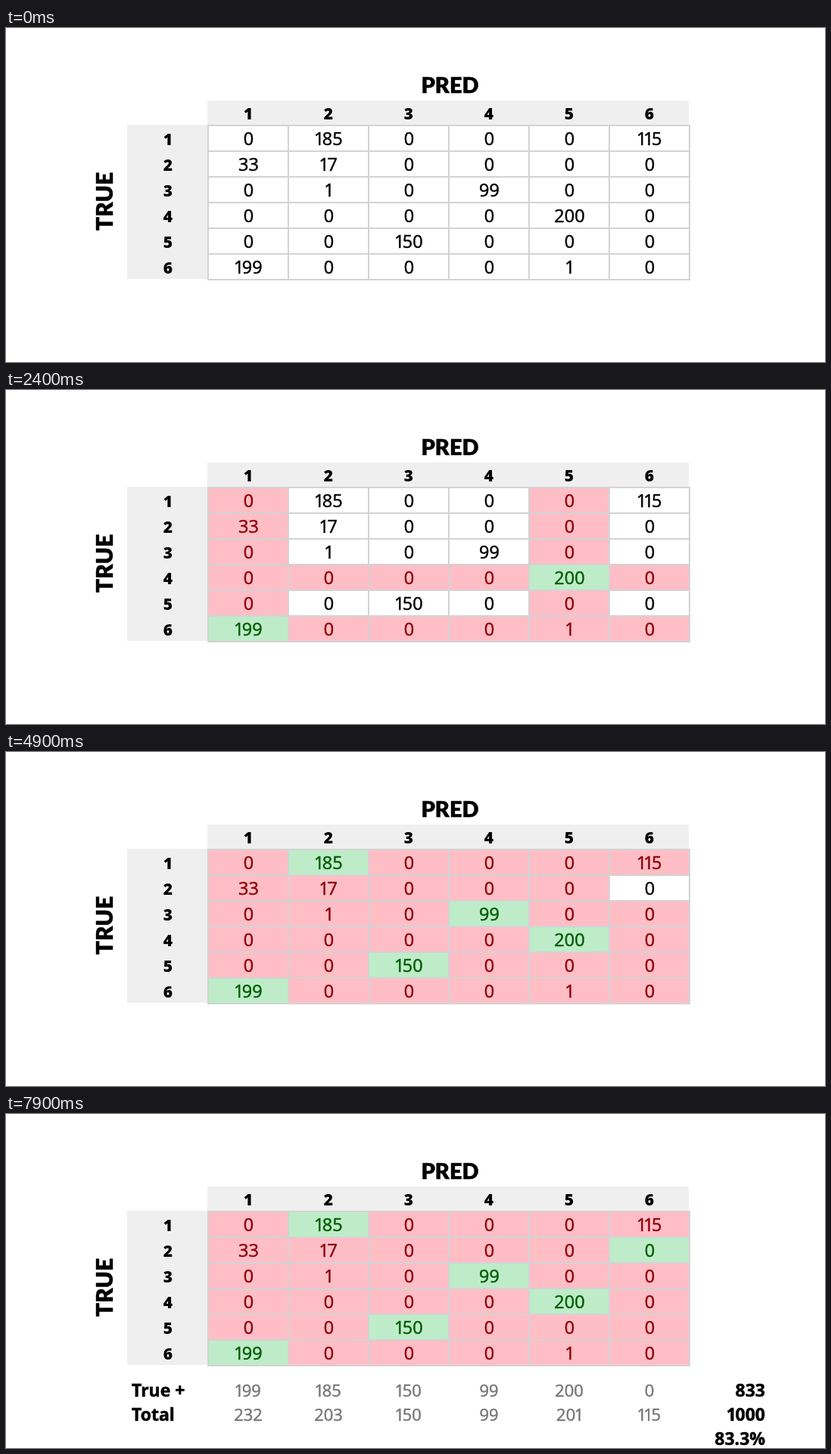
An HTML page that plays this animation: 1082x442 px, repeating every 8700 ms.

```html
<!DOCTYPE html>
<html lang="en">
<head>
<meta charset="utf-8">
<title>Confusion matrix matching</title>
<style>
  html, body { margin: 0; width: 100%; height: 100%; overflow: hidden; background: #fff; }
  svg { display: block; width: 1082px; height: 442px; }
  text {
    font-family: "Open Sans", "Noto Sans", sans-serif; font-variant-numeric: proportional-nums; text-anchor: middle;
    color: #000; fill: currentColor; stroke: currentColor; stroke-width: 0;
  }
  .title { font: 900 29px Lato, sans-serif; stroke-width: 0.4px; }
  .side { font-size: 30px; }
  .head { font-size: 21px; font-weight: 800; }
  .value { font-size: 23.5px; stroke-width: 0.5px; }
  .sum { font-size: 22px; color: #777; stroke-width: 0.5px; }
  .total { font-size: 23px; font-weight: 700; stroke-width: 0.5px; }
  .start { text-anchor: start; }
  .end { text-anchor: end; }
  rect.open { fill: #fff; }
  rect.miss { fill: #ffbec6; }
  rect.hit { fill: #beecc8; }
  text.miss { color: #900009; }
  text.hit { color: #005c00; }
</style>
</head>
<body>
<svg id="stage" viewBox="0 0 1082 442"></svg>
<script>
const LOOP = 8700, SUMS_AT = 6200;
const LEFT = 267, TOP = 129, W = 106, H = 34;
const matrix = [
  [0, 185, 0, 0, 0, 115],
  [33, 17, 0, 0, 0, 0],
  [0, 1, 0, 99, 0, 0],
  [0, 0, 0, 0, 200, 0],
  [0, 0, 150, 0, 0, 0],
  [199, 0, 0, 0, 1, 0]
];
// Each match claims one row and one column.
const matches = [
  { at: 1400, row: 3, col: 4 },
  { at: 2400, row: 5, col: 0 },
  { at: 3300, row: 0, col: 1 },
  { at: 4100, row: 4, col: 2 },
  { at: 4800, row: 2, col: 3 },
  { at: 5500, row: 1, col: 5 }
];

const stage = document.getElementById("stage");
function add(tag, attrs, content = "", parent = stage) {
  const node = document.createElementNS("http://www.w3.org/2000/svg", tag);
  for (const key in attrs) node.setAttribute(key, attrs[key]);
  node.textContent = content;
  return parent.appendChild(node);
}
const label = (x, y, content, cls, parent) => add("text", { x, y, class: cls }, content, parent);
const colX = col => LEFT + W * (col + 0.5);
const rowY = row => TOP + H * row;

label(586.5, 86, "PRED", "title");
add("text", { class: "title side", transform: "translate(140.5 229.5) rotate(-90)" }, "TRUE");
add("rect", { x: 266, y: 96, width: 636, height: 32, fill: "#efefef" });
add("rect", { x: 160, y: 128, width: 106, height: 204, fill: "#efefef" });

const cells = matrix.flatMap((values, row) => values.map((value, col) => ({
  row, col,
  box: add("rect", { x: LEFT + W * col, y: rowY(row), width: W, height: H, stroke: "#d3d3d3", "stroke-width": 2 }),
  text: label(colX(col) + 0.5, rowY(row) + 26, value)
})));
for (let i = 0; i < 6; i++) {
  label(colX(i), 120.5, i + 1, "head");
  label(214, rowY(i) + 25.5, i + 1, "head");
}

const sums = add("g", {});
const sum = list => list.reduce((a, b) => a + b, 0);
const hits = matrix[0].map((_, col) => {
  const match = matches.find(m => m.col === col);
  return matrix[match.row][col];
});
const totals = matrix[0].map((_, col) => sum(matrix.map(values => values[col])));
[["True +", hits], ["Total", totals]].forEach(([name, list], i) => {
  const y = 374 + 32 * i;
  label(166, y, name, "total start", sums);
  list.forEach((n, col) => label(colX(col), y, n, "sum", sums));
  label(1003, y, sum(list), "total end", sums);
});
label(1003, 438, (100 * sum(hits) / sum(totals)).toFixed(1) + "%", "total end", sums);

function draw() {
  const time = performance.now() % LOOP;
  const done = matches.filter(m => time >= m.at);
  for (const { row, col, box, text } of cells) {
    const state = done.some(m => m.row === row && m.col === col) ? "hit"
      : done.some(m => m.row === row || m.col === col) ? "miss" : "open";
    box.setAttribute("class", state);
    text.setAttribute("class", "value " + state);
  }
  sums.setAttribute("visibility", time >= SUMS_AT ? "visible" : "hidden");
  requestAnimationFrame(draw);
}
draw();
</script>
</body>
</html>
```
